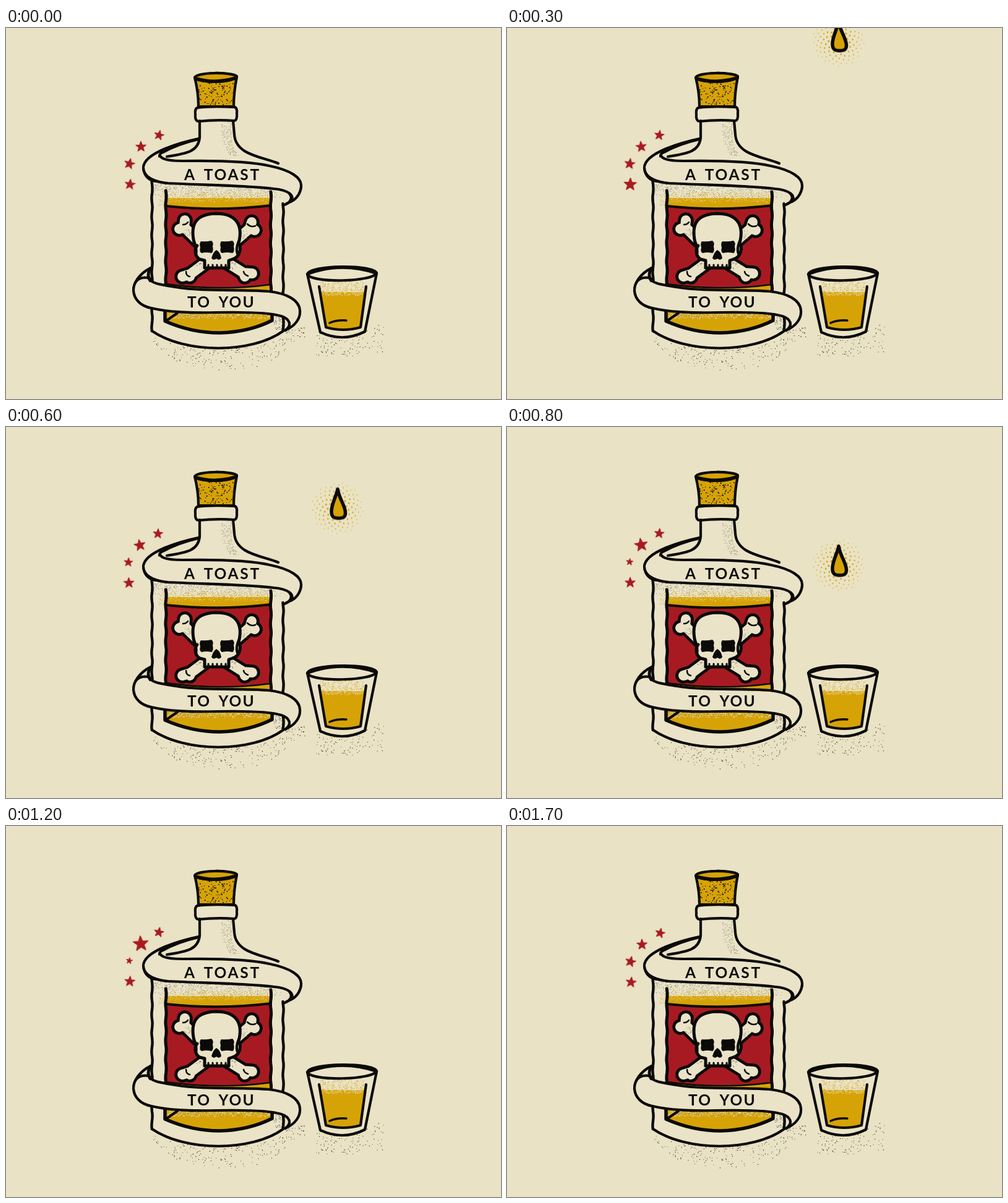
An HTML page that plays this animation: 800 by 600 pixels, repeating every 1.76 s.

```html
<!DOCTYPE html>
<html lang="en">
<head>
<meta charset="utf-8">
<title>A toast to you</title>
<style>
html, body { margin: 0; width: 100%; height: 100%; overflow: hidden; background: #e9e2c4; }
svg { display: block; position: absolute; left: 0; top: 0; }
.ink { fill: none; stroke: #0b0a08; stroke-width: 4.2; stroke-linecap: round; stroke-linejoin: round; }
.body { fill: #eae3c7; }
.bold { stroke-width: 5.5; }
.thin { stroke-width: 2.5; }
.black { fill: #0b0a08; }
.gold { fill: #d6a307; }
.red { fill: #a81a22; }
.dots { fill: none; stroke-linecap: round; }
.bone { fill: none; stroke-linecap: round; stroke-linejoin: round; }
.bone.edge { stroke: #0b0a08; stroke-width: 25.5; }
.bone.core { stroke: #eae3c7; stroke-width: 16; }
text { font: 700 24.5px Lato, "Open Sans", sans-serif; fill: #0b0a08; word-spacing: 5px; }

.drop { animation: fall 1760ms infinite; }
@keyframes fall {
  0% { transform: translateY(-82.6px); animation-timing-function: linear; }
  11.364% { transform: translateY(-82.6px); animation-timing-function: cubic-bezier(.3333, .395, .6667, .105); }
  62.5% { transform: translateY(548.2px); }
  100% { transform: translateY(548.2px); }
}
.orbit { animation: orbit 1760ms linear infinite; }
@keyframes orbit {
  0%, 100% { transform: translate(.6px, .8px) rotate(5deg); }
  17% { transform: translate(-.6px, .8px) rotate(0deg); }
  34% { transform: translate(-1.2px, 0) rotate(-4deg); }
  57% { transform: translate(-.3px, -1px) rotate(0deg); }
  80% { transform: translate(1px, -.5px) rotate(4deg); }
}
.star { fill: #a81a22; stroke: #a81a22; stroke-width: 1.2; stroke-linejoin: round; }
.grow-late { animation: late 1760ms linear infinite; }
@keyframes late {
  0%, 17%, 96%, 100% { transform: scale(1); }
  34% { transform: scale(1.06); }
  45.5% { transform: scale(1.23); }
  57% { transform: scale(1.43); }
  65% { transform: scale(1.46); }
  79.5% { transform: scale(1.28); }
}
.shrink { animation: shrink 1760ms linear infinite; }
@keyframes shrink {
  0%, 17%, 96%, 100% { transform: scale(1); }
  34% { transform: scale(.85); }
  45.5% { transform: scale(.68); }
  57%, 62% { transform: scale(.55); }
  79.5% { transform: scale(.78); }
}
.grow-early { animation: early 1760ms ease-in-out infinite; }
@keyframes early {
  0%, 34%, 100% { transform: scale(1); }
  17% { transform: scale(1.2); }
}
</style>
</head>
<body>
<svg width="800" height="600" viewBox="0 0 800 600">
  <defs>
    <mask id="sink" maskUnits="userSpaceOnUse" x="0" y="0" width="800" height="600">
      <rect width="800" height="414" fill="#fff"/>
      <g id="sinkDots"></g>
    </mask>
  </defs>

  <g id="ground"></g>

  <!-- bottle -->
  <path class="ink gold" d="M305 80 Q311 104 311 127 H368 Q368 104 373 79 Q340 66 305 80Z"/>
  <g id="corkDots"></g>
  <path class="ink gold" d="M305 80 C309 71 365 71 373 78 C368 89 313 90 305 80Z"/>
  <path class="ink bold" d="M307 82 Q337 91 371 81"/>

  <path class="body" d="M313 150 V177 C311 199 287 203 254 210 L236 230 V490 C290 527 397 527 448 490 V235 L440 219 C414 208 371 206 369 172 L367 150Z"/>
  <path class="ink" d="M236 490 C290 527 397 527 448 490 M440 219 C414 208 371 206 369 172 L367 150"/>
  <g id="neckDots"></g>
  <path class="ink body" d="M309 129 Q330 126 370 128 Q374 130 373 138 Q374 149 369 150 Q340 148 311 151 Q305 150 306 140 Q305 131 309 129Z"/>

  <path class="gold" d="M258 275 H428 V290 H258Z M258 410 H428 V430 H258Z"/>
  <g id="surface"></g>
  <path class="red" d="M258 288 Q343 297 428 287 V414 Q343 425 258 414Z"/>
  <path class="ink" d="M259 288 Q343 297 428 287"/>
  <path class="ink thin" d="M259 414 Q343 426 427 415"/>
  <path class="gold" d="M257 458 H430 V474 Q343 514 257 474Z"/>
  <g id="puddle"></g>
  <path class="ink bold" d="M257 458 V474 Q300 493 345 493 Q392 492 430 473 V460"/>
  <path class="ink" d="M258 474 L277 461"/>
  <g id="walls"></g>

  <!-- skull and bones -->
  <g id="bones"></g>
  <path class="ink thin" d="M286 318 Q291 318 294 314 M390 317 Q396 323 403 320 M291 394 Q291 401 297 402 M384 394 Q385 399 391 401"/>
  <path class="ink body" style="stroke-width:5" d="M304 347 C297 316 308 301 339 300 C371 300 384 317 376 348 C381 356 378 371 366 374 L360 376 V388 H321 V376 L313 374 C305 369 304 358 309 352"/>
  <path class="ink" d="M304 345 Q309 357 307 367 M376 345 Q371 357 374 365"/>
  <path class="black" d="M315 345 Q323 346 332 344 Q336 347 334 353 Q336 362 332 364 Q324 362 316 364 Q312 362 314 355 Q312 348 315 345Z
    M348 345 Q357 346 366 344 Q370 347 368 353 Q370 362 366 364 Q357 362 349 364 Q345 362 347 355 Q345 348 348 345Z
    M340 359 Q346 362 348 372 Q345 377 340 373 Q335 377 332 372 Q335 362 340 359Z"/>
  <path class="ink" style="stroke-width:3" d="M327 383 V388 M334 383 V388 M341 383 V388 M348 383 V388 M355 383 V388"/>
  <g id="boneDots"></g>

  <!-- upper ribbon -->
  <path class="ink body" d="M311 179 C287 184 222 201 222 226 C223 239 231 247 243 248 L262 214 C247 211 246 207 250 203 Q276 188 311 180"/>
  <path class="ink" d="M313 150 V177 C311 199 294 203 260 208"/>
  <path class="ink body" d="M448 287 C465 280 475 268 477 257 L440 259 C458 262 466 274 457 282Z"/>
  <path class="ink body" d="M250 208 Q255 215 285 215 C350 214 397 216 426 223 C460 230 478 242 477 256 C476 268 469 277 460 281 C468 271 456 262 433 260 C380 254 319 254 262 251 C236 249 222 239 222 226"/>
  <text x="288" y="246" letter-spacing="2.700">A TOAST</text>

  <!-- lower ribbon -->
  <path class="ink body" d="M234 388 C214 398 206 413 206 425 L238 412 C228 405 229 396 234 388Z"/>
  <path class="ink body" d="M206 425 C207 439 218 450 235 453 C264 460 298 461 340 460 C392 459 427 460 445 466 C457 470 464 480 451 489 C468 482 476 469 475 457 C474 439 452 429 425 426 C378 422 322 427 274 419 C250 415 234 413 230 404 C211 401 206 414 206 425Z"/>
  <path class="ink" d="M234 388 Q226 399 233 409"/>
  <text x="293" y="452" letter-spacing="2.200">TO YOU</text>

  <!-- glass -->
  <path class="ink body" d="M487 398 L508 492 Q544 509 580 491 L599 397 Q542 378 487 398Z"/>
  <path class="gold" d="M508 427 H580 L573 484 Q545 493 517 484Z"/>
  <g id="glassDots"></g>
  <g mask="url(#sink)">
    <g class="drop">
      <g transform="translate(536 3)">
        <g id="halo" class="gold"></g>
        <path class="ink gold bold" d="M0 0 C-3 14 -10 24 -10 36 C-10 45 -6 47 2 47 C10 47 13 44 12.5 37 C11 24 3 17 0 0Z"/>
      </g>
    </g>
  </g>
  <path class="ink" d="M487 398 C492 383 592 382 599 396 C594 411 492 413 487 398Z M506 418 L517 484 Q545 492 573 484 L582 418"/>
  <path class="ink" style="stroke-width:3.5" d="M523 477 Q534 472 550 473"/>

  <g id="stars"></g>
</svg>
<script>
const $ = id => document.getElementById(id);
const add = (id, markup) => $(id).insertAdjacentHTML('beforeend', markup);

let seed = 41;
function rnd() {
  seed = (seed + 0x6d2b79f5) | 0;
  let h = Math.imul(seed ^ (seed >>> 15), 1 | seed);
  h ^= h + Math.imul(h ^ (h >>> 7), 61 | h);
  return ((h ^ (h >>> 14)) >>> 0) / 4294967296;
}
const span = (a, b) => a + (b - a) * rnd();

// One path of round dots; place() returns a point.
function stipple(id, count, size, color, place) {
  let d = '';
  for (let i = 0; i < count; i++) {
    const [x, y] = place();
    d += `M${x.toFixed(1)} ${y.toFixed(1)}h.01`;
  }
  add(id, `<path class="dots" stroke="${color}" stroke-width="${size}" d="${d}"/>`);
}
// Dots that thin out from y = from towards y = to.
const fade = (x1, x2, from, to, power = 1.7) =>
  () => [span(x1, x2), from + (to - from) * rnd() ** power];

const BLACK = '#0b0a08', GOLD = '#d6a307', CREAM = '#eae3c7', GREY = '#7d765f';

for (const size of [.8, 1.2]) {
  stipple('ground', 105, size, BLACK, () => {
    const x = span(236, 484), u = (x - 343) / 112;
    const top = 490 + 28 * Math.sqrt(Math.max(0, 1 - u * u));
    const depth = 36 * Math.sqrt(Math.max(.1, 1 - ((x - 365) / 135) ** 2));
    return [x, (x > 452 ? 484 : top) + depth * rnd() ** 1.2];
  });
  stipple('ground', 58, size, BLACK, () => {
    const x = span(502, 612);
    return [x, x > 582 ? span(476, 524) : 496 + 35 * rnd() ** 1.1];
  });
}

for (const size of [1.3, 1.9]) {
  stipple('corkDots', 48, size, BLACK, () => {
    const y = span(88, 124), inset = (y - 80) * .13;
    return [span(308 + inset, 370 - inset), y];
  });
}
stipple('corkDots', 18, 1.2, BLACK, () => {
  const a = span(0, 6.28), r = Math.sqrt(rnd());
  return [339 + 27 * r * Math.cos(a), 79 + 4 * r * Math.sin(a)];
});
stipple('neckDots', 130, .9, GREY, () => {
  const y = span(153, 207), bend = Math.max(0, y - 175) ** 2 / 80;
  return [364 + bend - 16 * rnd() ** 1.4, y];
});

stipple('surface', 700, .9, GREY, fade(239, 446, 252, 274));
stipple('surface', 420, 1.1, GOLD, fade(262, 426, 277, 265));
stipple('surface', 220, 1, CREAM, fade(262, 426, 274, 282));
stipple('surface', 25, 1.2, '#dfae55', fade(247, 258, 272, 288));
stipple('puddle', 520, 1.1, CREAM, fade(262, 427, 461, 470));
stipple('puddle', 200, .9, GREY, fade(262, 427, 461, 470));
stipple('puddle', 45, .9, BLACK, fade(432, 446, 462, 488));
stipple('glassDots', 280, 1.1, GOLD, fade(508, 579, 428, 410));
stipple('glassDots', 190, 1.1, CREAM, fade(510, 577, 426, 433));
stipple('sinkDots', 300, 2, '#fff', fade(506, 582, 413, 431, 1.3));

// Hand-drawn uprights
function wall(x, y1, y2, weight) {
  let d = '';
  for (let y = y1; y <= y2; y += 4)
    d += `${d ? 'L' : 'M'}${(x + .6 * Math.sin(y * .21 + x)).toFixed(1)} ${y}`;
  add('walls', `<path class="ink" style="stroke-width:${weight}" d="${d}"/>`);
}
wall(236, 246, 490, 4.4);
wall(448, 284, 490, 4.4);
wall(258.5, 263, 420, 5);
wall(428, 265, 428, 5);

const bones = [
  'M310 344L288 322L289 311M288 322L280 325',
  'M371 344L394 324L397 314M394 324L402 327',
  'M325 378L298 398L285 402M298 398L297 402',
  'M355 378L384 396L398 397M384 396L386 402'
];
for (const d of bones)
  add('bones', `<path class="bone edge" d="${d}"/><path class="bone core" d="${d}"/>`);
const shades = [[307, 319, 380, 391], [363, 374, 379, 391], [288, 298, 336, 325], [382, 391, 341, 328]];
for (const area of shades)
  stipple('boneDots', 20, .9, GREY, fade(...area));

// Dotted glow: dots shrink outwards along a spiral
const haloCount = 115;
for (let i = 6; i < haloCount; i++) {
  const q = Math.sqrt(i / haloCount), a = i * 2.39996, r = 42 * q;
  add('halo', `<circle cx="${(r * Math.cos(a)).toFixed(1)}" cy="${(31 + r * Math.sin(a)).toFixed(1)}"
    r="${(2.2 - 1.6 * q).toFixed(2)}"/>`);
}

function starPath(r) {
  const points = [];
  for (let i = 0; i < 10; i++) {
    const a = i * Math.PI / 5, len = i % 2 ? r * .42 : r;
    points.push(`${(len * Math.sin(a)).toFixed(2)} ${(-len * Math.cos(a)).toFixed(2)}`);
  }
  return `M${points.join('L')}Z`;
}
const stars = [
  [246.8, 172.6, 8, 8, ''],
  [217.5, 191.2, 8.7, -6, 'grow-late'],
  [199, 218.8, 8.7, 8, 'shrink'],
  [199.8, 252.2, 8.6, 2, 'grow-early']
];
for (const [x, y, r, tilt, pulse] of stars)
  add('stars', `<g transform="translate(${x} ${y})"><g class="orbit"><g class="${pulse}">
    <path class="star" transform="rotate(${tilt})" d="${starPath(r)}"/></g></g></g>`);
</script>
</body>
</html>
```
